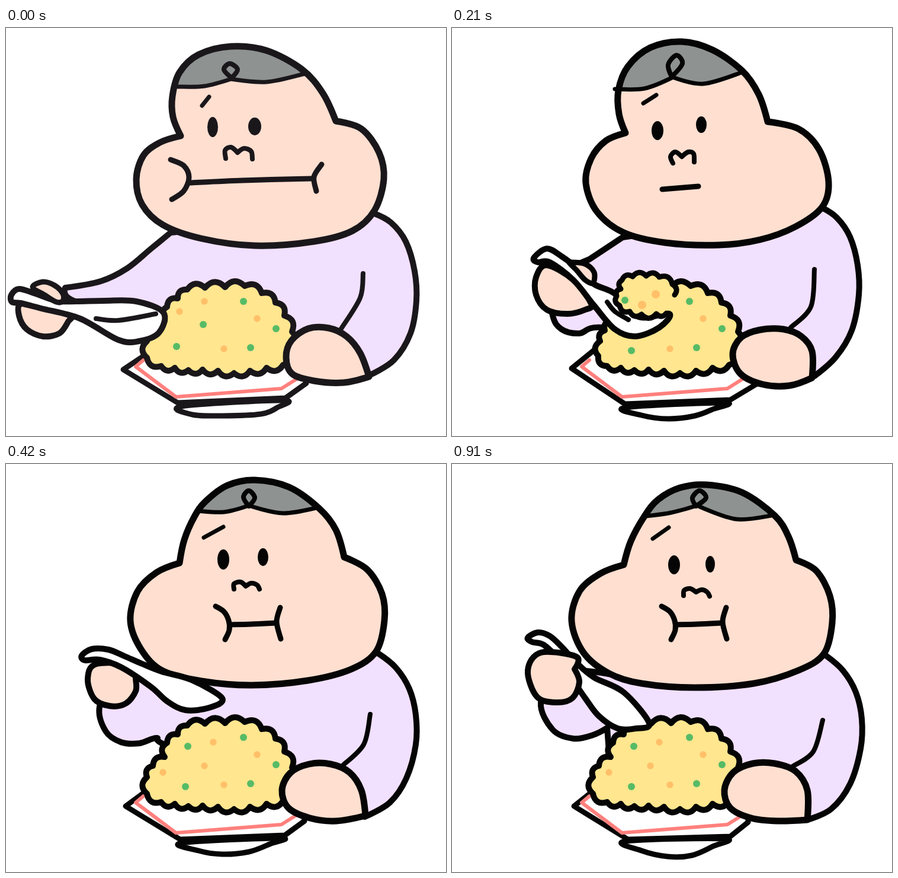
These frames come from a looping animation (743 px wide and 688 px high, 980 ms). An HTML page with a canvas:

```html
<!DOCTYPE html>
<html lang="en">
<head>
<meta charset="utf-8">
<title>Fried rice</title>
<style>
html, body { margin: 0; width: 100%; height: 100%; overflow: hidden; background: #fff; }
canvas { display: block; width: 743px; height: 688px; }
</style>
</head>
<body>
<canvas id="stage" width="743" height="688"></canvas>
<script>
const ctx = document.getElementById('stage').getContext('2d');
const SKIN = '#ffdfd0', SHIRT = '#f2e0ff', HAIR = '#8e9291', RICE = '#ffe68f';
const ORANGE = '#ffc069', GREEN = '#57bb66', RED = '#ff807d';

// Points are "x,y"; a trailing "!" makes a sharp corner.
const mound = '238,556 238,528 248,509 268,494 272,470 290,456 306,441 336,438 370,437 403,435 432,447 455,463 470,485 483,512 480,545 468,568 440,573 412,578 385,582 358,578 332,576 308,577 285,573 262,570';
const plate = '198,576! 240,548! 500,560! 507,599! 472,624! 290,632!';
const rim = '232,560! 219,571! 287,622! 465,608! 497,588!';
const early = { orange: '293,478 335,461 424,490 368,541', green: '401,461 333,500 288,537 456,507 413,539' };
const late = { orange: '350,469 424,490 335,509 368,541 265,520', green: '307,476 401,461 456,507 413,539 303,544' };

const reach = {
  ink: '#1a171b', mound, plate, ...early,
  torso: '620,312! 650,328 675,360 690,410 693,460 683,515 655,560 615,585! 520,550! 400,530! 270,490 200,485 110,458 100,438! 160,427 205,405 245,372 278,345!',
  head: '295,182! 282,150 281,115 293,75 325,45 380,31 440,38 500,70 535,110 557,157! 600,170 630,210 638,255 622,308 585,342 520,360 420,367 330,355 265,332 230,298 220,255 232,215 260,193',
  hair: '290,99 335,98 380,86! 440,91 505,77',
  curl: '381,84! 368,70 378,60 391,70',
  brow: '331,131 343,116',
  eyes: '349,167 9,17 420,166 11,15',
  nose: '371,220 370,206 380,201 391,210! 402,203 414,208 416,221',
  mouth: '278,222 300,232 309,252 300,275 280,289|310,261 400,257 515,254|533,230 520,251 524,275',
  foot: '297,638 315,652 365,654 430,651 458,640 467,628',
  arm: '473,555 482,527 510,507 545,506 575,520 598,548 613,588! 570,598 520,595 483,583',
  elbow: '603,414 598,455 566,507',
  fist: '25,465 22,485 35,508 62,520 90,515 105,495 108,485 60,470',
  thumb: '45,437 62,428 82,434 96,448 96,460 85,462 65,450',
  spoon: '10,462 9,450 22,440 50,448 85,460 118,461 165,460 220,461 266,480 258,514 225,528 190,526 125,490 60,473 25,464',
  groove: '152,490 190,493 253,482'
};
const lift = {
  mound, plate, ...early,
  torso: '625,312! 655,328 680,365 693,420 695,465 680,520 655,555 618,585! 520,550! 400,530! 282,460! 262,447 222,457 175,410 180,396! 210,385 240,364 272,350!',
  head: '274,178! 276,140 284,105 300,82 335,45 400,25 460,35 515,72 540,110 553,153! 600,168 633,210 642,255 628,310 590,347 530,362 450,366 350,358 265,345 222,315 206,272 215,230 240,200',
  hair: '300,93 345,92 390,78! 455,86 518,74',
  curl: '391,77! 380,62 389,46 399,61',
  brow: '335,124 351,109',
  eyes: '351,160 10,17 420,160 13,21',
  nose: '368,209 372,202 381,201 391,208! 400,202 410,205 414,212',
  mouth: '364,266 408,262',
  foot: '292,637 315,652 375,657 430,653 455,642 467,628',
  arm: '483,550 497,517 530,501 563,506 590,525 607,555 618,592! 570,608 525,602 492,582',
  elbow: '610,405 606,465 573,508',
  fist: '95,352 75,370 72,400 90,428 125,438 145,430 150,400 130,365',
  thumb: '130,350 155,355 170,380 168,402 152,408 140,395 133,370',
  spoon: '85,342 77,332 92,318 115,330 128,360 140,395 165,420 210,452 262,525 245,540 205,542 162,508 148,452 125,400 100,350',
  groove: '170,447 187,485 235,520'
};
const scoop = {
  mound: mound.replace('238,556 238,528 248,509', '247,553 250,528 258,510'),
  plate: '202,574! 250,535! 500,560! 515,600! 470,627! 292,634!',
  orange: '424,490 368,541', green: '401,461 456,507 413,539 303,544',
  torso: '625,303! 650,320 672,352 685,400 687,450 675,510 648,555 612,587! 520,550! 400,530! 255,505 215,515 185,508 170,485 165,430 200,405 232,390! 288,353!',
  head: '293,177! 282,145 281,105 297,65 335,33 388,23 440,37 490,72 518,112 533,158! 585,170 620,205 636,260 625,302 580,335 520,357 450,366 360,362 290,345 245,310 226,262 235,220 260,190',
  hair: '275,103 325,102 373,83! 425,94 492,74',
  curl: '371,82! 365,62 379,46 389,60',
  brow: '323,127 345,113',
  eyes: '347,173 10,16 421,163 9,14',
  nose: '373,228 369,217 377,209 388,217! 399,209 408,212 409,226',
  mouth: '355,272 416,267',
  foot: '293,640 320,653 365,659 410,654 440,643 460,632',
  arm: '474,550 488,522 520,509 560,508 590,520 608,545 608,590! 570,603 525,601 487,583',
  elbow: '612,407 606,470 572,505',
  fist: '160,400 142,420 142,450 160,475 195,482 225,475 235,465 205,425',
  thumb: '200,395 225,398 240,412 238,430 225,425 210,408 200,398',
  spoon: '145,395 138,388 160,372 185,385 215,408 240,432 275,448 315,487 367,482 350,505 310,520 275,508 240,468 205,425 165,395',
  groove: '262,462 275,478 298,492',
  bite: '362,481 345,482 320,483 300,478 283,468 278,452 285,440 287,425 305,419 328,418 350,420 372,432 376,450',
  biteOrange: '344,449 321,467', biteGreen: '292,459'
};
const eat = {
  mound, plate, ...late,
  torso: '625,315! 655,338 680,372 692,415 694,465 680,520 655,560 612,590! 520,550! 400,530! 272,463 245,479 212,485 182,475 166,452 165,415 190,365 270,348!',
  head: '296,163! 300,125 310,90 325,65 362,32 410,18 465,30 512,62 545,100 560,152! 605,175 632,215 635,260 622,312 580,343 510,360 420,369 340,362 265,345 235,310 218,265 228,215 258,180',
  hair: '318,70 365,79 406,70! 455,73 512,60',
  curl: '407,70! 395,55 402,44 411,56',
  brow: '329,121 368,105',
  eyes: '358,151 10,17 432,145 10,15',
  nose: '379,200 378,190 389,188 398,195! 405,189 416,191 421,199',
  open: '396,277 58,62',
  foot: '300,642 330,652 365,654 415,648 450,637 465,630',
  arm: '471,550 485,522 515,506 550,507 580,522 600,550 614,585! 565,601 520,597 483,580',
  elbow: '603,411 597,460 563,505',
  fist: '155,355 148,375 155,400 175,413 200,412 222,398 231,375 225,355',
  thumb: '178,336 188,328 200,325 213,328 222,336 212,338 190,338',
  spoon: '130,362 127,352 145,340 180,336 215,340 250,338 285,340 335,343 397,352 375,376 325,384 295,375 265,357 210,355 160,355',
  bite: '385,338 360,342 335,342 310,341 290,341 288,332 295,320 305,305 322,297 342,291 365,294 382,303 390,322',
  biteOrange: '352,306 349,330', biteGreen: '307,337', biteBehind: 'yes'
};
const chew = {
  mound, ...late, fistFront: 'yes',
  plate: '206,577! 240,550! 500,560! 500,604! 470,628! 297,633!',
  torso: '630,322! 660,348 682,385 692,430 690,480 672,540 640,582 600,600! 520,550! 400,530! 265,485! 262,445! 238,457 205,463 170,448 150,402 180,350 270,355!',
  head: '290,170! 302,130 325,88 348,60 385,40 430,35 490,48 545,87 568,122 581,162! 615,180 638,222 642,268 628,320 585,348 510,370 410,377 320,370 265,353 222,318 202,265 215,215 250,185',
  hair: '328,88 370,82 414,70! 480,93 545,86',
  curl: '412,71! 406,57 418,45 429,57',
  brow: '339,126 366,107',
  eyes: '375,170 10,16 436,169 8,14',
  nose: '391,222 392,213 402,210 412,216! 422,212 431,216 435,223',
  mouth: '354,240 368,249 376,264 377,280 370,296|378,271 415,270 455,268|463,242 457,266 464,295',
  foot: '293,636 320,652 365,662 405,660 440,645 460,632',
  arm: '460,550 475,520 508,505 545,505 580,518 600,550 600,600! 550,602 505,597 470,580',
  elbow: '626,432 610,485 575,510',
  fist: '150,318 128,348 143,392 175,402 203,395 215,368 207,346! 210,325',
  spoon: '135,300 128,293 145,284 165,290 185,308 210,335 240,360 290,385 333,437 310,446 280,446 248,425 225,395 180,330 155,305'
};
const wide = '282,226 304,238 313,260 304,284 284,300|313,270 425,266 530,264|553,228 532,262 552,300';

// Halfway drawing between two poses.
const numbers = s => s.match(/\d+/g) || [];
function mid(a, b) {
  const to = numbers(b);
  if (to.length !== numbers(a).length) return a;
  let i = 0;
  return a.replace(/\d+/g, n => Math.round((+n + +to[i++]) / 2));
}
function between(a, b, extra) {
  const pose = {};
  for (const k in a) if (k in b) pose[k] = mid(a[k], b[k]);
  return { ...pose, ...extra };
}

const chewWide = { ...chew, mouth: wide };
const chewMid = { ...chew, mouth: mid(chew.mouth, wide) };
const steps = [
  reach, lift, between(lift, scoop), scoop,
  between(scoop, eat, { mouth: '', open: '391,273 44,34' }), eat,
  between(eat, chew, { mouth: chew.mouth }),
  chew, chewWide, chewMid, chew, chewWide, chewMid, chew
];
const STEP = 70;

const points = s => s.split(' ').map(p => {
  const [x, y] = p.split(',').map(parseFloat);
  return { x, y, sharp: p.endsWith('!') };
});

function spline(s, closed) {
  const pts = points(s), n = pts.length, path = new Path2D();
  const at = i => closed ? pts[(i + n) % n] : pts[Math.max(0, Math.min(n - 1, i))];
  const handle = (i, dir) => {
    const p = at(i), k = p.sharp ? 0 : dir / 6;
    return [p.x + (at(i + 1).x - at(i - 1).x) * k, p.y + (at(i + 1).y - at(i - 1).y) * k];
  };
  path.moveTo(pts[0].x, pts[0].y);
  for (let i = 0; i < (closed ? n : n - 1); i++) {
    path.bezierCurveTo(...handle(i, 1), ...handle(i + 1, -1), at(i + 1).x, at(i + 1).y);
  }
  if (closed) path.closePath();
  return path;
}

// Outward bumps between neighbouring points.
function scallop(s, closed) {
  const pts = points(s), path = new Path2D();
  if (closed) pts.push(pts[0]);
  path.moveTo(pts[0].x, pts[0].y);
  for (let i = 1; i < pts.length; i++) {
    const a = pts[i - 1], b = pts[i], dx = b.x - a.x, dy = b.y - a.y;
    path.quadraticCurveTo((a.x + b.x) / 2 + dy * 0.55, (a.y + b.y) / 2 - dx * 0.55, b.x, b.y);
  }
  return path;
}

function paint(path, fill, width) {
  if (fill) { ctx.fillStyle = fill; ctx.fill(path); }
  if (width) { ctx.lineWidth = width; ctx.stroke(path); }
}
const shape = (s, fill, width = 10) => s && paint(spline(s, true), fill, width);
const line = (s, width) => s && paint(spline(s, false), null, width);

function oval(x, y, rx, ry, fill, width) {
  const path = new Path2D();
  path.ellipse(x, y, rx, ry, 0, 0, Math.PI * 2);
  paint(path, fill, width);
}
const dots = (s, r, fill) => points(s).forEach(p => oval(p.x, p.y, r, r, fill));

function drawHead(p, ink) {
  const head = spline(p.head, true);
  paint(head, SKIN);
  const hair = spline(p.hair, false), ends = points(p.hair), top = new Path2D(hair);
  top.lineTo(ends[4].x + 20, 0);
  top.lineTo(ends[0].x - 20, 0);
  ctx.save();
  ctx.clip(head);
  paint(top, HAIR);
  ctx.restore();
  paint(hair, null, 7);
  shape(p.curl, null, 8);
  paint(head, null, 11);
  line(p.brow, 7);
  const e = numbers(p.eyes).map(Number);
  oval(...e.slice(0, 4), ink);
  oval(...e.slice(4), ink);
  line(p.nose, 8);
  if (p.open) oval(...numbers(p.open).map(Number), RED, 10);
  if (p.mouth) p.mouth.split('|').forEach(s => line(s, 9));
}

function drawBite(p) {
  paint(scallop(p.bite), RICE, 9);
  dots(p.biteOrange, 7, ORANGE);
  dots(p.biteGreen, 6, GREEN);
}

function drawBowl(p, ink) {
  shape(p.foot, '#fff', 9);
  shape(p.plate, '#fff', 9);
  ctx.strokeStyle = RED;
  line(rim, 6);
  ctx.strokeStyle = ink;
  paint(scallop(p.mound, true), RICE, 10);
  dots(p.orange, 5.7, ORANGE);
  dots(p.green, 6, GREEN);
}

function draw(p) {
  const ink = p.ink || '#050505';
  ctx.fillStyle = '#fff';
  ctx.fillRect(0, 0, 743, 688);
  ctx.strokeStyle = ink;
  ctx.lineCap = ctx.lineJoin = 'round';
  shape(p.torso, SHIRT);
  line(p.elbow, 8);
  drawHead(p, ink);
  drawBowl(p, ink);
  shape(p.arm, SKIN, 11);
  if (!p.fistFront) shape(p.fist, SKIN);
  if (p.bite && p.biteBehind) drawBite(p);
  shape(p.spoon, '#fff');
  line(p.groove, 8);
  if (p.fistFront) shape(p.fist, SKIN);
  shape(p.thumb, SKIN, 9);
  if (p.bite && !p.biteBehind) drawBite(p);
}

let shown = -1;
function tick() {
  const step = Math.floor(performance.now() / STEP) % steps.length;
  if (step !== shown) draw(steps[shown = step]);
  requestAnimationFrame(tick);
}
tick();
</script>
</body>
</html>
```
